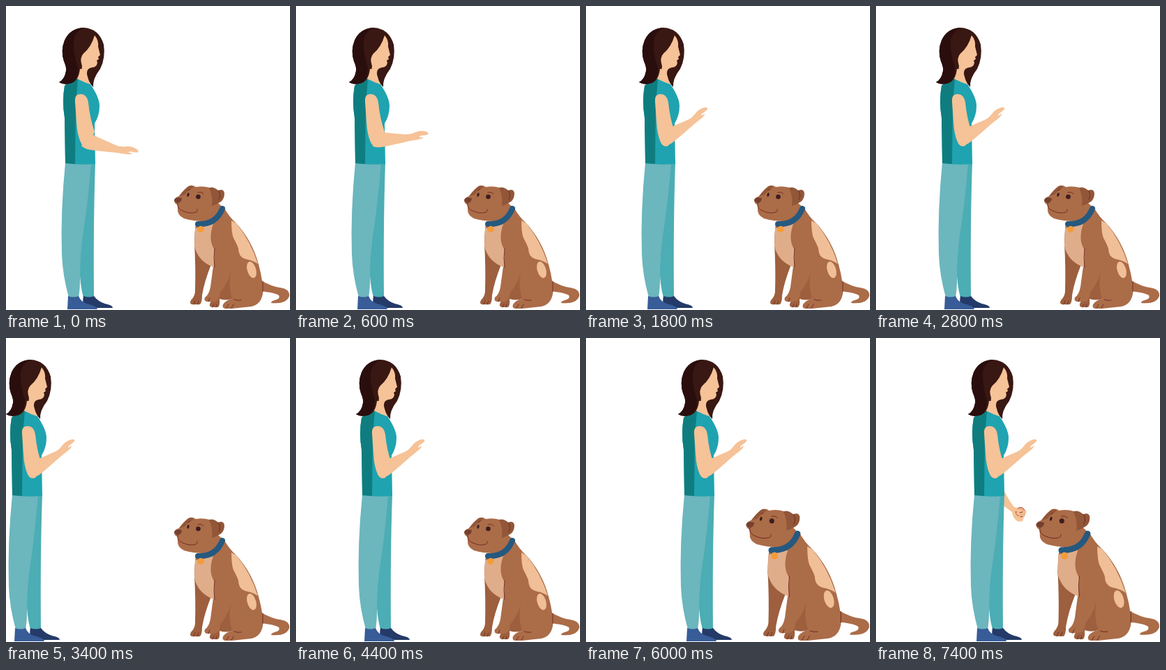
Recreate the animation shown at these times as an HTML page. Size 407x435 px, loop 8.4 s.

```html
<!DOCTYPE html>
<html lang="en">
<head>
<meta charset="utf-8">
<title>Dog training: stay</title>
<style>
html, body { margin: 0; height: 100%; overflow: hidden; background: #fff }
svg { display: block; width: 407px; height: 435px }
.skin { fill: #f6c297 }
.line { fill: none; stroke: #6b2a22; stroke-width: .9; stroke-linecap: round }
</style>
</head>
<body>
<svg viewBox="0 0 407 435">
  <g id="dog" fill="#ab6c48">
    <path d="M364 392Q382 402 393 403Q407 405 406 415Q402 427 380 425Q380 422 385 421Q394 419 391 414Q385 410 364 408Z"/>
    <path fill="#9d5f3e" d="M270 340Q272 375 271 408Q271 415 265 421Q262 427 268 427H278Q281 424 281 414Q284 395 294 370L299 340Z"/>
    <path fill="#9d5f3e" d="M296 410Q297 419 293 424Q290 430 295 431H304Q307 428 306 420L312 408Z"/>
    <path d="M272 312L312 288Q320 302 330 311Q353 336 362 370Q369 395 368 412Q365 427 352 430L324 433H314Q309 432 311 427Q315 421 324 419L307 412Q306 422 298 423H288Q283 422 285 417Q291 413 293 402L297 372Q272 365 270 342Q270 325 272 312Z"/>
    <path fill="#9d5f3e" d="M322 380Q319 395 307 410L306 419Q315 422 324 419Q318 400 322 380Z"/>
    <path fill="#e0ad8b" d="M271 318L297 312Q289 335 299 349L298 374Q276 366 270 344Z"/>
    <path fill="#f0be97" d="M323 307L330 311Q350 335 361 369Q354 364 343 362Q333 359 333 347Q331 341 326 332Q323 325 323 307Z"/>
    <ellipse cx="352" cy="377.500" rx="6.300" ry="12" fill="#f0be97" transform="rotate(-17 352 377.500)"/>
    <path class="line" d="M299 347Q297 360 299 374M368 394V409M269 427L271 422M274 427L276 422M290 423L292 418M296 431L298 427M301 431L302 427M316 432L319 427M323 432L326 427M327 420Q332 422 337 421"/>
    <path d="M241 278Q242 274 248 272L261 258Q267 255 272 259Q282 257 292 260L306 272L304 282L313 290Q303 306 285 308Q268 308 255 304Q245 299 246 290Q246 286 245 284Q241 282 241 278Z"/>
    <path fill="#925638" d="M248 272Q256 261 262 258Q268 256 268 260Q260 264 256 270ZM291 260Q298 258 304 264Q312 261 313 268Q313 276 308 280Q302 284 295 286Q297 273 291 260Z"/>
    <path class="line" d="M304 264Q309 270 305 277M246 282Q245 290 253 293Q264 298 272 295Q275 294 274 291M275 267Q280 265 283 269M261 264L264 262"/>
    <path fill="#76402f" d="M241 278Q242 274 247 274L252 275Q252 280 247 282Q243 282 241 278Z"/>
    <g fill="#3d1d20">
      <circle cx="275.500" cy="273" r="3.300"/>
      <ellipse cx="261" cy="270" rx="1.600" ry="2.800" transform="rotate(15 261 270)"/>
    </g>
    <path d="M275 312Q301 313 310 290" fill="none" stroke="#25597f" stroke-width="8" stroke-linecap="round"/>
    <circle cx="279" cy="319.500" r="4.700" fill="#f49c3a"/>
  </g>

  <g id="woman">
    <g id="treatArm">
      <path class="skin" d="M112 200L127 217Q134 232 142 242Q148 243 154 246L158 251L154 262Q147 264 144 260Q140 256 139 249L124 238Z"/>
      <g id="treat">
        <circle cx="151" cy="249" r="6.500" fill="#f0b183" stroke="#a5482f"/>
        <path d="M143 245L151 248M147 251L158 249M148 257L156 254" stroke="#f6c297" stroke-width="3.600" stroke-linecap="round"/>
        <path class="line" d="M150 250L154 249M151 256L154 255"/>
      </g>
    </g>
    <path id="frontLeg" fill="#4cadb4" d="M94 224H128Q125 310 126 417H111Q106 400 105 370Q101 300 94 224Z"/>
    <path id="frontShoe" fill="#243a68" d="M111 415Q119 418 126 415Q132 423 142 426Q153 428 153 432H112Q109 424 111 415Z"/>
    <path id="backLeg" fill="#6cb6be" d="M85 224H122Q118 275 112 316Q106 350 106 392Q106 406 104 417H90Q81 385 80 355Q78 295 85 224Z"/>
    <path id="backShoe" fill="#375c98" d="M89 415Q97 418 104 415Q107 423 116 426Q130 429 131 434H88Z"/>
    <path fill="#1fa3b0" d="M102 104Q113 108 121 112Q134 131 134 143Q134 157 127 168L128 226Q106 228 85 225L84 160Q80 136 84 114Q92 106 102 104Z"/>
    <path fill="#0f7d7f" d="M103 104L100 140L99 226L85 225L84 160Q80 136 84 114Q92 106 103 104Z"/>
    <path class="skin" d="M104 82H118L121 112Q111 109 102 104Z"/>
    <path fill="#391712" d="M111 31Q133 32 140 55Q143 74 135 90Q124 104 125 116Q117 109 115 91L106 90Q104 109 91 111Q82 113 76 109Q84 105 86 93Q87 88 83 79Q78 64 84 49Q92 32 111 31Z"/>
    <path fill="#2a0e0e" d="M111 31Q95 39 97 58Q98 75 103 88Q103 109 91 111Q82 113 76 109Q84 105 86 93Q87 88 83 79Q78 64 84 49Q92 32 111 31Z"/>
    <path class="skin" d="M127 42Q133 49 132 58L135 70L132 73L133 76L130 78L131 81Q130 88 123 88Q116 89 116 96L106 98Q109 92 109 86Q105 74 111 68Q122 59 127 42Z"/>
    <path class="skin" d="M99 137Q98 126 107 126Q116 126 118 138Q120 160 127 180L118 200Q111 203 107 195Q102 184 101 166Z"/>
    <path id="forearm" class="skin" d="M119 180Q123 184 130 187L157 199Q164 202 171 201Q179 200 186 204Q191 207 189 209.500Q185 210 178 208L175 209.500L181 211Q179 213 172 212L159 210Q137 208 122 206Q113 205 108 200Z"/>
  </g>
</svg>
<script>
const $ = id => document.getElementById(id);
const set = (id, value) => $(id).setAttribute('transform', value);
const clamp = v => Math.max(0, Math.min(1, v));
// Progress in nine equal steps of 100 ms
const steps = (t, start) => clamp((Math.floor((t - start) / 100) + 1) / 9);
const within = (t, a, b) => t >= a && t < b;
const places = [[6000, 56], [5400, 0], [4400, 10], [3400, -76], [2800, 10], [0, 0]];

// Lean a leg from the hip and carry its shoe along the floor
function stride(side, dx) {
  const slope = dx / 192;
  set(side + 'Leg', `matrix(1 0 ${slope} 1 ${-225 * slope} 0)`);
  set(side + 'Shoe', `translate(${dx})`);
}

function draw(now) {
  const t = now % 8400;
  set('woman', `translate(${places.find(p => t >= p[0])[1]})`);
  set('forearm', `rotate(${-28 * steps(t, 100) - 19 * steps(t, 1000)} 110 195)`);
  stride('back', within(t, 2900, 3400) ? -87 : 0);
  stride('front', within(t, 3900, 4400) || within(t, 5500, 6000) ? 68 : 0);
  set('dog', t < 5400 ? '' : 'translate(407 432) scale(1.07) translate(-407 -432)');
  set('treatArm', `rotate(${35 * (1 - steps(t, 6500))} 109 200)`);
  $('treatArm').style.display = t < 6500 ? 'none' : '';
  $('treat').style.display = t < 7400 ? 'none' : '';
  requestAnimationFrame(draw);
}
draw(0);
</script>
</body>
</html>
```
